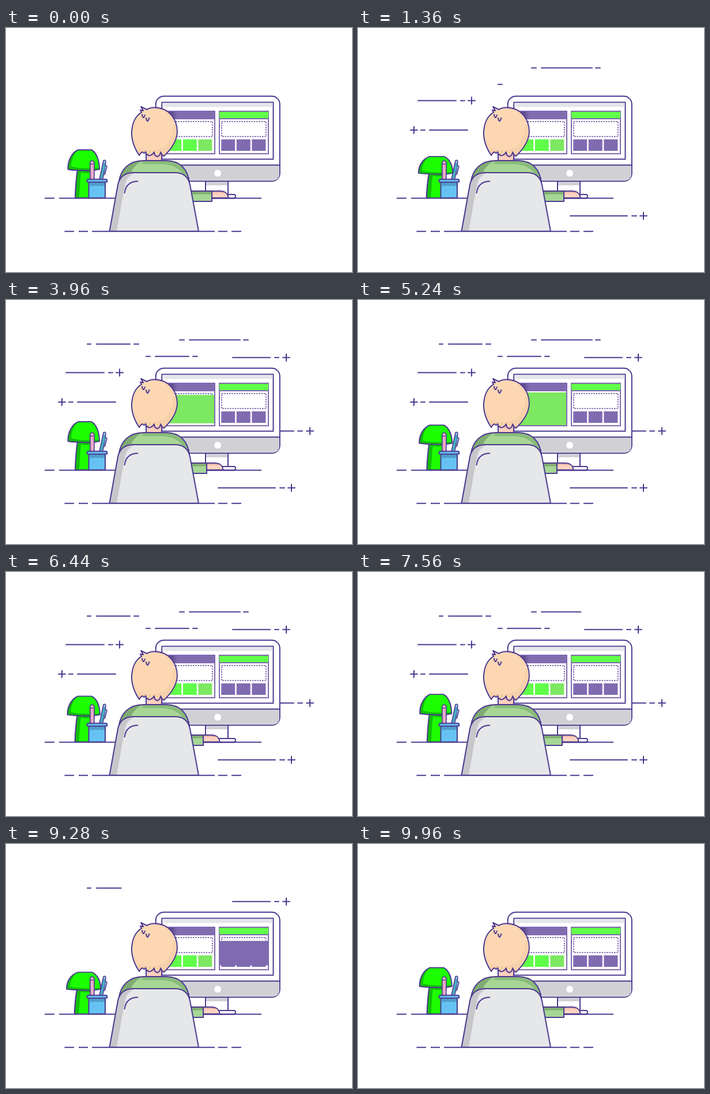
An HTML page with a canvas for the animation above (10000 ms loop, 600x425 px).

```html
<!DOCTYPE html>
<html lang="en">
<head>
<meta charset="utf-8">
<title>Desk work</title>
<style>
  html, body { margin: 0; width: 100%; height: 100%; overflow: hidden; background: #fff; }
  canvas { display: block; }
</style>
</head>
<body>
<canvas id="stage" width="600" height="425"></canvas>
<script>
const ctx = document.getElementById('stage').getContext('2d');
const LOOP = 10000;
const INK = '#4c3991', PURPLE = '#806bb1', GREEN = '#60ff49', SOFT_GREEN = '#7de862';
const ERASE_DELAY = 7380, DRAW_TIME = 500;

// Background strokes: start time, y, segments in drawing order, optional plus centre
const strokes = [
  [40, 69.5, [[301, 309], [318, 406], [412, 420]]],
  [250, 177.8, [[190, 124], [116, 109]], 97],
  [500, 327.3, [[368, 467], [475, 483]], 495],
  [750, 126.5, [[104, 170], [178, 185]], 197],
  [1290, 98.2, [[243, 250], [259, 317], [324, 332]]],
  [1480, 228.3, [[430, 499], [506, 514]], 527],
  [1730, 76.8, [[141, 147], [157, 215], [222, 230]]],
  [1960, 100.3, [[393, 458], [466, 473]], 486]
];
const handKeys = [[0, 357], [2400, 357], [3120, 342], [4250, 349], [4950, 342], [5600, 349],
  [6240, 342], [6480, 342], [7200, 357], [7400, 357], [7950, 342], [8700, 349],
  [9100, 342], [9300, 342], [9860, 357], [LOOP, 357]];

const clamp = v => Math.max(0, Math.min(1, v));
const ease = v => (1 - Math.cos(Math.PI * clamp(v))) / 2;
const ramp = (t, from, to) => ease((t - from) / (to - from));

function shape(d, fill, stroke = INK, width = 2) {
  const path = new Path2D(d);
  if (fill) { ctx.fillStyle = fill; ctx.fill(path); }
  if (stroke) { ctx.strokeStyle = stroke; ctx.lineWidth = width; ctx.stroke(path); }
}
function box(x, y, w, h, fill, stroke, r = 0) {
  const path = new Path2D();
  path.roundRect(x, y, w, h, r);
  if (fill) { ctx.fillStyle = fill; ctx.fill(path); }
  if (stroke) { ctx.strokeStyle = stroke; ctx.lineWidth = 2; ctx.stroke(path); }
}
function clipped(d, draw) {
  ctx.save();
  ctx.clip(new Path2D(d));
  draw();
  ctx.restore();
}

function drawStroke(t, [start, y, parts, plus]) {
  const shown = clamp((t - start) / DRAW_TIME) - clamp((t - start - ERASE_DELAY) / DRAW_TIME);
  if (shown <= 0) return;
  const from = parts[0][0];
  const dir = Math.sign(parts[0][1] - from);
  const end = plus ? plus + 6 * dir : parts[parts.length - 1][1];
  const head = from + (end - from) * shown;
  const reach = x => dir > 0 ? Math.min(x, head) : Math.max(x, head);
  const line = (a, b) => (head - a) * dir > 0 ? `M${a} ${y}H${reach(b)}` : '';
  let d = parts.map(([a, b]) => line(a, b)).join('');
  if (plus) {
    d += line(plus - 6 * dir, plus + 6 * dir);
    if ((head - plus) * dir > 0) d += `M${plus} ${y - 6}v12`;
  }
  shape(d);
}

function browser(x, header, thumbs, fillColor, fillAmount) {
  box(x, 145, 85, 74, '#fff');
  ctx.setLineDash([2.4, 1.9]);
  box(x + 4, 163, 77, 26, null, PURPLE);
  ctx.setLineDash([]);
  thumbs.forEach((color, i) => box(x + 3.2 + i * 26.6, 194, 24, 20, color));
  if (fillAmount > 0) {
    const half = 29 * fillAmount;
    box(x, 190 - half, 85, 2 * half, fillColor);
  }
  box(x, 145, 85, 74, null, PURPLE);
  box(x, 146, 85, 12, header);
  box(x - 1, 157, 87, 2, PURPLE);
}

function monitor(t) {
  box(346, 262, 39, 29, '#fff', INK);
  box(347, 267, 37, 7, '#d1d1d5');
  box(335, 290, 63, 6.5, '#fff', INK, 3);
  box(259.8, 118.8, 215, 148, '#fff', INK, 14);
  clipped('M261 239H474V253Q474 266 461 266H274Q261 266 261 253Z',
    () => box(260, 239, 215, 28, '#d1d1d5'));
  shape('M260 238.7H475');
  box(270.3, 129.5, 193.2, 99, '#fff', INK);
  box(271.3, 130.5, 191.2, 7, '#e6e5e9');
  const left = ramp(t, 3570, 4090) - ramp(t, 5550, 6070);
  const right = ramp(t, 7900, 8420) - ramp(t, 9100, 9620);
  browser(277, PURPLE, [GREEN, GREEN, SOFT_GREEN], SOFT_GREEN, left);
  browser(370, GREEN, [PURPLE, PURPLE, PURPLE], PURPLE, right);
  ctx.fillStyle = '#fff';
  ctx.beginPath();
  ctx.arc(367, 253, 6, 0, 7);
  ctx.fill();
}

function mushroom(t) {
  const squash = (1 - Math.cos(2 * Math.PI * (t * 33 / LOOP - 0.05))) / 2;
  ctx.save();
  ctx.translate(134.5, 296);
  ctx.scale(1 + 0.09 * squash, 1 - 0.145 * squash);
  ctx.translate(-134.5, -296);
  const stem = 'M124 246Q121 266 120 296H149V246Z';
  const cap = 'M107.5 246C107 231 114 217 125 212H148C158 217 162 233 162 246Q150 249 137 248Q119 248 107.5 246Z';
  shape(stem, '#1dff00', null);
  clipped(stem, () => shape('M118 246H150V251Q138 254 130 251Q128 270 127 296H118Z', '#12bd08', null));
  shape(stem);
  shape(cap, '#1dff00', null);
  clipped(cap, () => shape('M104 248Q106 222 125 210Q113 225 113 241Q130 246 164 243V250H104Z', '#12bd08', null));
  shape(cap);
  ctx.restore();
}

function pencilCup() {
  shape('M146 266V234Q149.5 228 153 234V266Z', '#f6b7cf', INK, 1.6);
  shape('M146 237H153', null, INK, 1.4);
  ctx.setLineDash([1, 2]);
  shape('M148.5 239V264M151 240V264', null, '#8a5b92', 1);
  ctx.setLineDash([]);
  shape('M162 264L168 236L173 237L167 266Z', '#47b6c5', INK, 1.6);
  shape('M168 236L169 231Q172 229 173 232L172 237M172 240L175 241L171 256', '#8ed8ed', INK, 1.6);
  box(143.5, 267, 28.5, 29, '#65c2f2', INK);
  box(144.5, 269, 26.5, 6, '#519dca');
  box(140.5, 263.5, 35, 5, '#65c2f2', INK, 2.5);
}

function arm(t) {
  const i = handKeys.findIndex(key => key[0] > t);
  const [t0, x0] = handKeys[i - 1], [t1, x1] = handKeys[i];
  const x = x0 + (x1 - x0) * ramp(t, t0, t1);
  const hand = `M${x} 284H${x + 14}C${x + 22} 284 ${x + 28} 288 ${x + 28.5} 296H${x}Z`;
  shape(hand, '#fdd3c2', null);
  clipped(hand, () => box(x, 284, 22, 3.5, '#e9b3a7'));
  shape(hand);
  box(300, 284, x - 300, 18, '#a6d694');
  box(300, 284, x - 300, 5.5, '#80ad72');
  box(300, 284, x - 300, 18, null, INK);
}

function person() {
  box(243, 210, 27, 21, '#fdcfbd', INK);
  box(244, 216, 25, 6, '#e9aaa0');

  const body = 'M195.5 270C198 246 214 231 238 231H278C301 231 316 246 318 270Z';
  shape(body, '#a6d694', null);
  clipped(body, () => {
    shape('M190 275Q200 230 238 230H243Q221 235 214 259L200 275Z', '#7fac73', null);
    shape('M236 230H280Q314 233 320 275H314Q308 239 272 237H236Z', '#8bbb7c', null);
  });
  shape(body);

  const chair = 'M179.5 354L194 273C197 259 207 252 220 252H293C307 252 316 259 319 273L334 354Z';
  shape(chair, '#e6e7e9', null);
  clipped(chair, () => shape('M178 354L193 270Q198 250 224 252Q209 258 206 274L192 354Z', '#c7c6cb', null));
  shape(chair);
  shape('M205.5 288Q208 267 229 267');

  // Soft shade beside the head
  const shade = ctx.createLinearGradient(282, 0, 297, 0);
  shade.addColorStop(0, '#3a2871b0');
  shade.addColorStop(1, '#3a287100');
  box(280, 146, 17, 12, shade);

  const head = 'M231 222Q217 200 218 181C219 164 225 153 235 147L233 143L238 144L234 137L244 142'
    + 'C249 139 253 138.5 258 138.5C282 139 297 158 297 181Q296 202 274 223Q270 222 268.5 216Q266 224 262 224'
    + 'Q257 222 257 216Q252 223 248 222Q243 221 242 215.5Q240 220 237 216Q233 217 231 222Z';
  shape(head, '#fcd7b2', null);
  clipped(head, () => shape('M230 207Q252 218 274 207Q290 190 292 168L300 170V226H230Z', '#f6d0aa', null));
  shape(head);
  shape('M236 150Q236 156 239 156L241 151M243 156Q243 162 246 162L249 156');
}

function render(t) {
  ctx.fillStyle = '#fff';
  ctx.fillRect(0, 0, 600, 425);
  ctx.lineCap = 'round';
  ctx.lineJoin = 'round';
  strokes.forEach(stroke => drawStroke(t, stroke));
  ctx.lineCap = 'butt';
  monitor(t);
  shape('M67 296.4H84M92 296.4H443M101.5 354.3H118M126 354.3H142M149 354.3H362M368 354.3H384M391 354.3H408');
  mushroom(t);
  pencilCup();
  arm(t);
  person();
}

function tick() {
  render(performance.now() % LOOP);
  requestAnimationFrame(tick);
}
tick();
</script>
</body>
</html>
```
